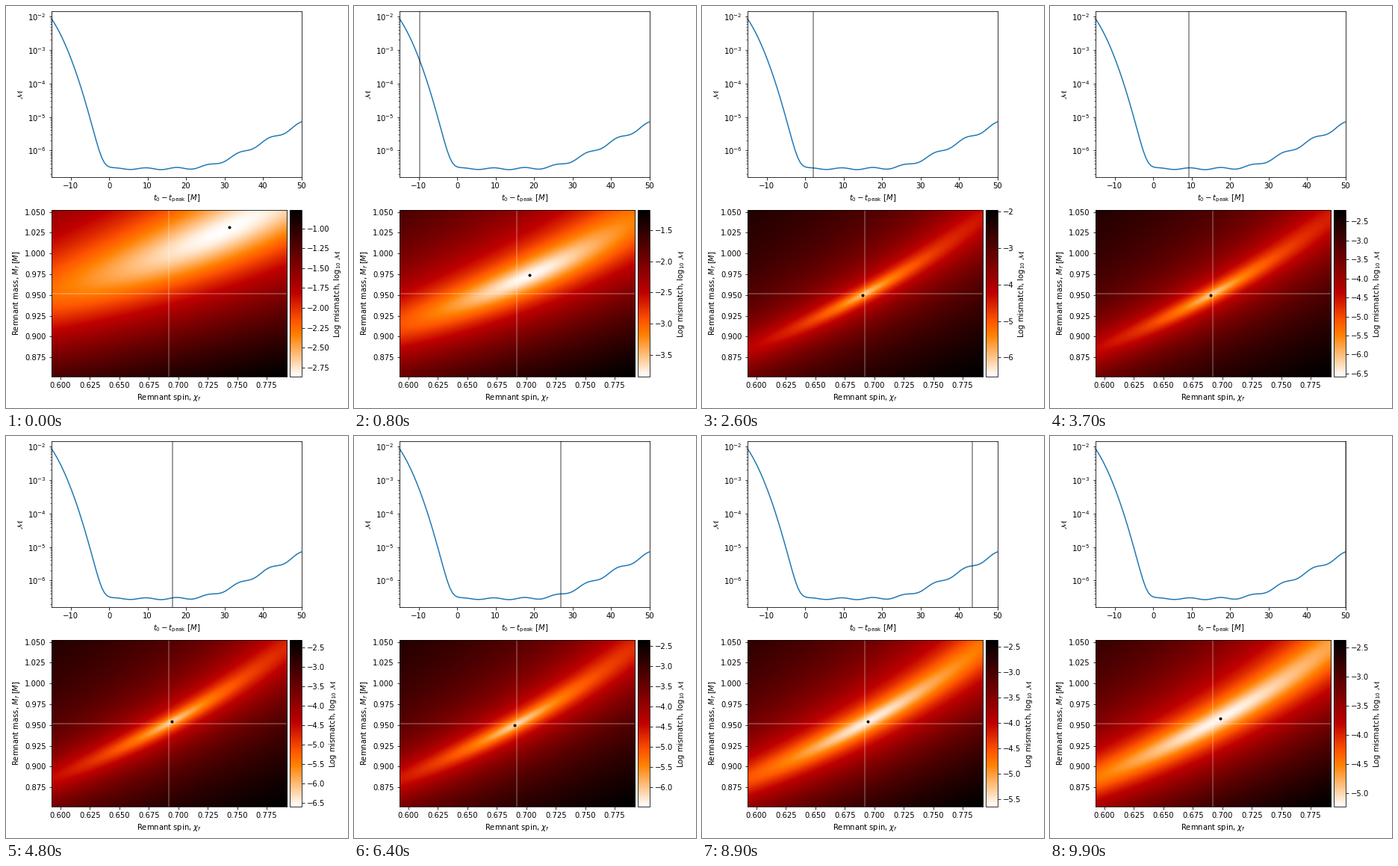
Animation, 458 px wide and 538 px high, one loop 10000 ms. Source, as a matplotlib script:

```python
import numpy as np
import matplotlib.pyplot as plt
from matplotlib.animation import FuncAnimation
from mpl_toolkits.axes_grid1 import make_axes_locatable

W, H, DPI = 458, 538, 72
FRAMES, INTERVAL = 100, 100
CHI_F, M_F, HALF, RES = 0.6922, 0.9520, 0.1, 50
OVERTONES = 7


def mismatch(t):
    """Mismatch at the true remnant values: steep fall, flat floor, rippled rise."""
    u = t + 15
    fall = -2.06 - 0.17 * u - 0.0127 * u ** 2
    rise = 0.056 * 2.5 * np.log1p(np.exp((t - 26) / 2.5))
    ripple = (0.02 + 0.0007 * t) * np.cos(2 * np.pi * (t - 1.5) / 8)
    return 10 ** fall + 10 ** (-6.54 + rise + ripple)


def qnm(chi, mass):
    """Frequency and damping rate of the fundamental (2,2) mode."""
    omega = (1.5251 - 1.1568 * (1 - chi) ** 0.1292) / mass
    quality = 0.7 + 1.4187 * (1 - chi) ** -0.499
    return omega, omega / (2 * quality)


times = np.linspace(-15, 50, FRAMES)
chis = np.linspace(CHI_F - HALF, CHI_F + HALF, RES)
masses = np.linspace(M_F - HALF, M_F + HALF, RES)
step = chis[1] - chis[0]
OMEGA, GAMMA = qnm(*np.meshgrid(chis, masses))


def surface(t):
    """log10 mismatch of a decaying mode against a fundamental and its overtones."""
    early = np.clip(-t / 15, 0, 1)
    # The best fit starts far off, then wanders near the true values
    drift = 1.6 * (t / 50) ** 4 + 0.4 * np.cos(2 * np.pi * (t - 16.5) / 20)
    w0, g0 = qnm(CHI_F + step * (drift + 12.5 * early ** 3.7),
                 M_F + step * (drift + 19.5 * early ** 3))
    tilt = 1.3 * early - 0.2
    weight = 0.65 + 2.9 * early

    dw, dg = OMEGA - w0, GAMMA - g0
    res = ((dw + tilt * dg) ** 2 + weight * dg ** 2) / (dw ** 2 + (GAMMA + g0) ** 2)
    for n in range(1, OVERTONES + 1):
        g = (2 * n + 1) * GAMMA
        res = res * (dw ** 2 + (g - g0) ** 2) / (dw ** 2 + (g + g0) ** 2)

    floor = mismatch(t) * 10 ** -(0.08 + 0.72 * early)
    top = 10 ** (-2.38 + 2.4 / (1 + np.exp((t + 9.75) / 7.5)))
    return np.log10(floor + top * res / res.max())


fig = plt.figure(figsize=(W / DPI, H / DPI), dpi=DPI)


def panel(y, x=60.75, w=334.8, h=222.15):
    return fig.add_axes([x / W, 1 - (y + h) / H, w / W, h / H])


ax1, ax2 = panel(7.1), panel(273.45)

ax1.semilogy(times, mismatch(times))
cursor = ax1.axvline(times[0], color="k", alpha=0.5)
ax1.set_xlim(-15, 50)
ax1.set_ylim(10 ** -6.797, 10 ** -1.846)
ax1.set_xlabel(r"$t_0 - t_{\mathrm{peak}}\ [M]$")
ax1.set_ylabel(r"$\mathcal{M}$")

image = ax2.imshow(surface(times[0]), origin="lower", aspect="auto",
                   extent=[chis[0], chis[-1], masses[0], masses[-1]],
                   interpolation="bicubic", cmap="gist_heat_r")
ax2.axvline(CHI_F, color="white", alpha=0.3)
ax2.axhline(M_F, color="white", alpha=0.3)
best, = ax2.plot([], [], "o", color="k", markersize=3)
ax2.set_xlabel(r"Remnant spin, $\chi_f$")
ax2.set_ylabel(r"Remnant mass, $M_f\ [M]$")

cax = make_axes_locatable(ax2).append_axes("right", size="5%", pad=0.05)
fig.colorbar(image, cax=cax, label=r"Log mismatch, $\mathrm{log}_{10}\ \mathcal{M}$")


def update(i):
    grid = surface(times[i])
    image.set_data(grid)
    image.set_clim(grid.min(), grid.max())
    r, c = np.unravel_index(grid.argmin(), grid.shape)
    best.set_data([chis[c]], [masses[r]])
    cursor.set_xdata([times[i], times[i]])
    return image, best, cursor


anim = FuncAnimation(fig, update, frames=FRAMES, interval=INTERVAL,
                     repeat=True, repeat_delay=0, blit=False)
plt.show()
```
